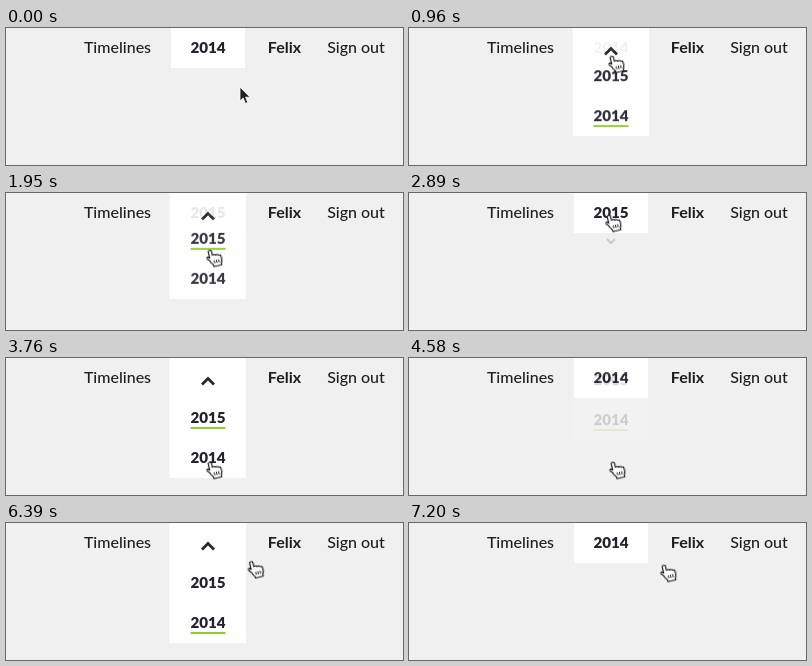
Write an HTML page that moves like this. It is 397 by 137 pixels and loops after 7250 ms.

```html
<!DOCTYPE html>
<html lang="en">
<head>
<meta charset="utf-8">
<title>Year menu</title>
<style>
html, body { margin: 0; width: 100%; height: 100%; overflow: hidden; background: #f0f0f0; }
svg { display: block; width: 397px; height: 137px; }
text { font: 500 16px Lato, "Open Sans", sans-serif; fill: #1e1e1e; text-anchor: middle; }
.bold { font-weight: 700; }
.year { font-weight: 900; font-size: 15.2px; fill: #23222e; }
.chevron { fill: none; stroke: #2a2930; stroke-width: 2.8; }
.hint { fill: none; stroke: #cacaca; stroke-width: 2; }
.line { fill: #8fce2b; }

.panel, .list, .y14, .y15, .line, .hint, .cursor, .arrow, .hand, .click {
  animation: 7.25s linear infinite;
}
.y14, .y15, .line, .arrow, .hand, .click { animation-timing-function: step-end; }
.panel { animation-name: fade; }
.list { animation-name: slide; }
.y14 { animation-name: show14; }
.y15 { animation-name: show15; }
.line { animation-name: mark; }
.hint { animation-name: hint; }
.cursor { animation-name: move; }
.arrow { animation-name: arrow; }
.hand { animation-name: hand; }
.click { animation-name: click; }

/* menu opens and closes three times */
@keyframes fade {
  0%, 29.9%, 64.28%, 98.21%, 100% { opacity: 0; }
  11.6%, 44.71%, 79.05% { opacity: 0; animation-timing-function: ease; }
  13.93%, 47.03%, 81.38% { opacity: 1; }
  26.04%, 60.41%, 94.34% { opacity: 1; animation-timing-function: ease-in-out; }
}
@keyframes slide {
  0%, 29.9%, 64.28%, 98.21%, 100% { transform: translateY(-40px); }
  11.6%, 44.71%, 79.05% { transform: translateY(-40px); animation-timing-function: ease; }
  15.59%, 48.69%, 83.03% { transform: none; }
  26.04%, 60.41%, 94.34% { transform: none; animation-timing-function: ease; }
}

/* selected year */
@keyframes show14 { 0%, 59.86%, 100% { opacity: 1; } 25.66% { opacity: 0; } }
@keyframes show15 { 0%, 59.86%, 100% { opacity: 0; } 25.66% { opacity: 1; } }
@keyframes mark {
  0%, 59.86%, 100% { transform: translateY(40px); }
  25.66% { transform: none; }
}
@keyframes hint {
  0%, 5.38%, 15.6%, 37.66%, 48.7%, 73.5%, 83.1%, 100% { opacity: 0; }
  7%, 15.59%, 39.2%, 48.69%, 75%, 83.03% { opacity: 1; }
}

/* pointer */
@keyframes move {
  0%, 100% { transform: translate(234px, 59px); }
  1.52% { transform: translate(234px, 59px); animation-timing-function: ease-in-out; }
  8.28% { transform: translate(204px, 28px); }
  18.07% { transform: translate(204px, 28px); animation-timing-function: ease-in-out; }
  22.2% { transform: translate(205px, 57px); }
  35.72% { transform: translate(205px, 57px); animation-timing-function: ease-in; }
  37.66% { transform: translate(213px, 40px); animation-timing-function: ease-out; }
  39.86% { transform: translate(201px, 22px); }
  47.59% { transform: translate(201px, 22px); animation-timing-function: ease-in-out; }
  51.86% { transform: translate(205px, 104px); }
  64.28% { transform: translate(205px, 104px); animation-timing-function: ease-in-out; }
  67.03% { transform: translate(205px, 99px); }
  69.52% { transform: translate(205px, 99px); animation-timing-function: ease-in-out; }
  75.17% { transform: translate(219px, 28px); }
  83.86% { transform: translate(219px, 28px); animation-timing-function: ease-in-out; }
  90.48%, 99.99% { transform: translate(256px, 42px); }
}
@keyframes arrow {
  0%, 35.72%, 69.52%, 100% { opacity: 1; }
  5.38%, 37.66%, 73.5% { opacity: 0; }
}
@keyframes hand {
  0%, 35.72%, 69.52%, 100% { opacity: 0; }
  5.38%, 37.66%, 73.5% { opacity: 1; }
}
@keyframes click {
  0%, 11.59%, 26.2%, 44.83%, 60.14%, 78.9%, 94.07%, 100% { opacity: 0; }
  8.83%, 24.69%, 42.48%, 57.66%, 75.59%, 91.31% { opacity: 1; }
}
</style>
</head>
<body>
<svg viewBox="0 0 397 137">
  <text x="111.5" y="25">Timelines</text>
  <text class="bold" x="278.5" y="25">Felix</text>
  <text x="350" y="25">Sign out</text>

  <rect x="165" width="74" height="40" fill="#fff"/>
  <text class="year y14" x="202" y="25">2014</text>
  <text class="year y15" x="202" y="25">2015</text>
  <path class="hint" d="M198 46l4 4 4-4"/>

  <g class="panel">
    <g class="list">
      <rect x="163.5" y="-40" width="76.5" height="160" fill="#fff"/>
      <text class="year" x="202" y="65">2015</text>
      <text class="year" x="202" y="105">2014</text>
      <rect class="line" x="184.5" y="69" width="35" height="2"/>
    </g>
    <path class="chevron" d="M196 26.5l6-6 6 6"/>
  </g>

  <g class="cursor">
    <circle class="click" r="10" cy="-1.5" fill="none" stroke="#23222e" stroke-width="1.1"/>
    <path class="arrow" d="M0 0V14L3.2 11 5.4 16.4 7.8 15.4 5.6 10.2H10Z" fill="#222" stroke="#fff" stroke-width=".8"/>
    <g class="hand" stroke="#111" stroke-width="1.1" stroke-linejoin="round">
      <g transform="translate(-1.5 .3) rotate(-14) scale(1.03)">
        <path fill="#fff" d="M-2.2 10L-4 7.8Q-4.6 5.8-2.9 6L-1.6 7.4V1.5Q-1.6 0 0 0T1.6 1.5V5.4Q4 4.4 4.5 6 6.6 5.2 7.2 6.8 9.5 6.4 9.5 8.6V11Q9.3 13 8.2 14.5V16.5H.4V15Q-1.2 13-2.2 10Z"/>
        <path fill="none" stroke-width=".9" d="M2 10.5v3.2M4.2 10.5v3.2M6.4 10.5v3.2"/>
      </g>
    </g>
  </g>
</svg>
</body>
</html>
```
